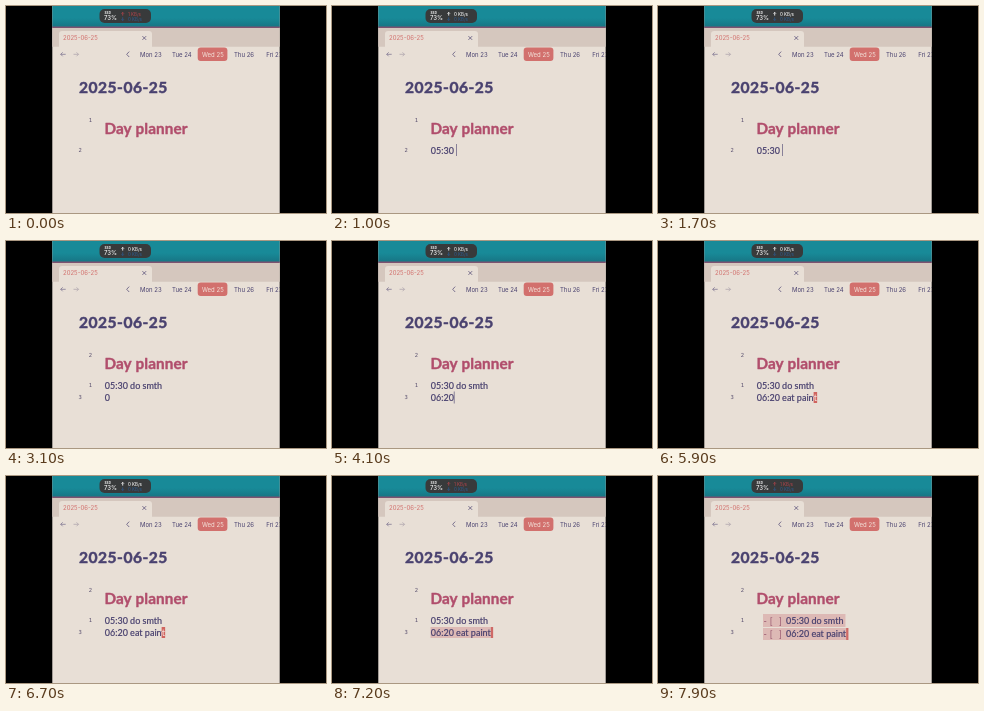
An HTML page with a canvas for the animation above (8 s loop, 320 by 207 pixels).

```html
<!DOCTYPE html>
<html lang="en">
<head>
<meta charset="utf-8">
<title>Day planner</title>
<style>
  html, body { margin: 0; width: 100%; height: 100%; overflow: hidden; background: #000; }
  canvas { display: block; width: 100vw; height: 100vh; }
</style>
</head>
<body>
<canvas id="stage"></canvas>
<script>
const W = 320, H = 207, LOOP = 8000;
const canvas = document.getElementById('stage');
const ctx = canvas.getContext('2d');
const UI = 'Inter, sans-serif', NOTE = 'Lato, sans-serif';
const INK = '#49416f', ROSE = '#d2706d', SELECT = '#ddb9b5', PAPER = '#e8dfd6';
const BODY = `500 9px ${NOTE}`;

// Each entry holds from its time until the next one.
const firstLine = [
  [0, ''], [400, '05'], [500, '05:3'], [600, '05:30 '],
  [1900, '05:30 d'], [2000, '05:30 do'], [2100, '05:30 do '], [2200, '05:30 do s'],
  [2400, '05:30 do smth']
];
const secondLine = [
  [0, ''], [2700, '0'], [3500, '06'], [3700, '06:'], [3900, '06:2'], [4100, '06:20'],
  [4200, '06:20 '], [4600, '06:20 e'], [4800, '06:20 ea'], [5000, '06:20 eat'],
  [5300, '06:20 eat '], [5400, '06:20 eat p'], [5500, '06:20 eat pa'],
  [5600, '06:20 eat pai'], [5700, '06:20 eat pain'], [5800, '06:20 eat paint']
];
const traffic = [
  [0, ['red', 'blue']], [1000, ['white', 'blue']], [4700, ['white', 'white']],
  [5600, ['white', 'blue']], [6800, ['red', 'blue']]
];
const caretOn = [[400, 1100], [1600, 2600], [3300, 4400], [4600, 5000], [5300, 5900]];
const blockOn = [[5900, 6200], [6600, 7000]];
const NEW_LINE = 2500, SELECT_ONE = 7000, SELECT_BOTH = 7600, MAKE_TASKS = 7900;

const at = (track, t) => track.filter(([start]) => start <= t).pop()[1];
const during = (spans, t) => spans.some(([a, b]) => t >= a && t < b);

function box(x, y, w, h, color, radius = 0) {
  ctx.fillStyle = color;
  ctx.beginPath();
  ctx.roundRect(x, y, w, h, radius);
  ctx.fill();
}

// A positive weight thickens the letters with an outline.
function text(str, x, y, font, color, weight = 0, spacing = 0) {
  ctx.font = font;
  ctx.letterSpacing = `${spacing}px`;
  ctx.fillStyle = ctx.strokeStyle = color;
  ctx.fillText(str, x, y);
  if (weight) {
    ctx.lineWidth = weight;
    ctx.lineJoin = 'round';
    ctx.strokeText(str, x, y);
  }
  ctx.letterSpacing = '0px';
}

function stroke(path, color, width = 0.7) {
  ctx.strokeStyle = color;
  ctx.lineWidth = width;
  ctx.stroke(new Path2D(path));
}

function widthOf(str) {
  ctx.font = BODY;
  return ctx.measureText(str).width;
}

function drawMonitor(t) {
  box(93.5, 3, 51.5, 14, '#383a3b', 5);
  text('SSD', 98.5, 8.2, `700 3.2px ${UI}`, '#eee');
  text('73%', 98, 14.2, `500 6px ${UI}`, '#f4f4f4');
  const colors = { red: '#a4434a', blue: '#2f5682', white: '#eeeeee' };
  at(traffic, t).forEach((tone, row) => {
    const y = 8 + row * 4.9;
    const arrow = row ? `M116.7 ${y - 1.6}v3.2m-1.2 -1.2l1.2 1.2l1.2 -1.2`
                      : `M116.7 ${y + 1.6}v-3.2m-1.2 1.2l1.2 -1.2l1.2 1.2`;
    stroke(arrow, colors[tone], 0.9);
    const label = tone === 'red' ? '1 KB/s' : '0 KB/s';
    text(label, 122, y + 1.6, `500 4.4px ${UI}`, colors[tone]);
  });
}

function drawWindow(t) {
  const sky = ctx.createLinearGradient(0, 12, 0, 21);
  sky.addColorStop(0, '#188a98');
  sky.addColorStop(1, '#177584');
  box(46, 0, 228, H, PAPER);
  box(46, 0, 228, 21, sky);
  box(46, 20.5, 228, 1.5, '#7c5270');
  box(46, 22, 228, 18.7, '#d5c7be');
  box(53, 25, 93, 16, PAPER, [3, 3, 0, 0]);
  drawMonitor(t);

  text('2025-06-25', 57, 34.2, `400 6px ${UI}`, ROSE);
  stroke('M136.4 30.1l3.8 3.8m0 -3.8l-3.8 3.8', INK);
  stroke('M59.7 48.3h-5m2 -2l-2 2l2 2', '#756b8b');
  stroke('M67.5 48.3h5m-2 -2l2 2l-2 2', '#aaa0aa');
  stroke('M123.2 45.6l-2.5 2.7l2.5 2.7', INK);

  box(191.7, 41.6, 29.7, 13.5, ROSE, 3);
  ['Mon 23', 'Tue 24', 'Wed 25', 'Thu 26', 'Fri 27'].forEach((day, i) => {
    const x = [134, 166, 196, 228, 260.3][i];
    text(day, x, 50.5, `400 6px ${UI}`, i === 2 ? '#f3e4dc' : INK);
  });
}

function drawNote(t) {
  const tasks = t >= MAKE_TASKS;
  const twoLines = t >= NEW_LINE;
  const first = at(firstLine, t), second = at(secondLine, t);
  const x = tasks ? 128 : 98.7;
  const y1 = 147.5, y2 = tasks ? 161 : 160;
  const active = twoLines ? second : first;
  const end = x + widthOf(active);

  text('2025-06-25', 72.9, 87, `700 15.6px ${NOTE}`, INK, 0.5, 0.5);
  text('Day planner', 98.4, 128, `700 15.3px ${NOTE}`, '#b14e6c', 0.4, 0.1);

  const number = (n, nx, ny) => text(n, nx, ny, '5.5px "DejaVu Sans Mono", monospace', '#574e6d');
  number(twoLines ? '2' : '1', 82.8, 116.2);
  if (twoLines) number('1', 82.8, 146);
  number(twoLines ? '3' : '2', 72.5, twoLines ? 158.4 : 145.8);

  if (t >= SELECT_ONE) {
    const left = tasks ? 105 : 98.5;
    const top = tasks ? 152 : 151;
    if (t >= SELECT_BOTH) {
      box(left, 138, x + widthOf(first) - left + 2, tasks ? 13 : 12.5, SELECT);
    }
    box(left, top, end - left, tasks ? 12 : 11, SELECT);
    box(end, top, 2.3, tasks ? 12 : 11, '#cf6966');
  }

  [[first, y1], [second, y2]].forEach(([line, y]) => {
    if (tasks) {
      text('-', 105.5, y, BODY, '#9d5d73');
      text('[', 111.7, y, BODY, '#9d5d73');
      text(']', 121, y, BODY, '#9d5d73');
    }
    text(line, x, y, BODY, INK, 0.15);
  });

  if (during(caretOn, t)) {
    box(end, twoLines ? 150.5 : 138, 0.6, 12, INK);
  }
  if (during(blockOn, t)) {
    const left = x + widthOf(second.slice(0, -1));
    box(left, 151, Math.max(3.5, end - left), 11, '#d0645f');
    text(second.slice(-1), left, y2, BODY, '#f5e6df');
  }
}

function render(now) {
  const t = now % LOOP;
  const ratio = devicePixelRatio || 1;
  const w = Math.round(innerWidth * ratio), h = Math.round(innerHeight * ratio);
  if (canvas.width !== w || canvas.height !== h) {
    canvas.width = w;
    canvas.height = h;
  }
  ctx.setTransform(w / W, 0, 0, h / H, 0, 0);
  box(0, 0, W, H, '#000');
  ctx.save();
  ctx.beginPath();
  ctx.rect(46.3, 0, 227.4, H);
  ctx.clip();
  drawWindow(t);
  drawNote(t);
  ctx.restore();
  requestAnimationFrame(render);
}

render(0);
</script>
</body>
</html>
```
